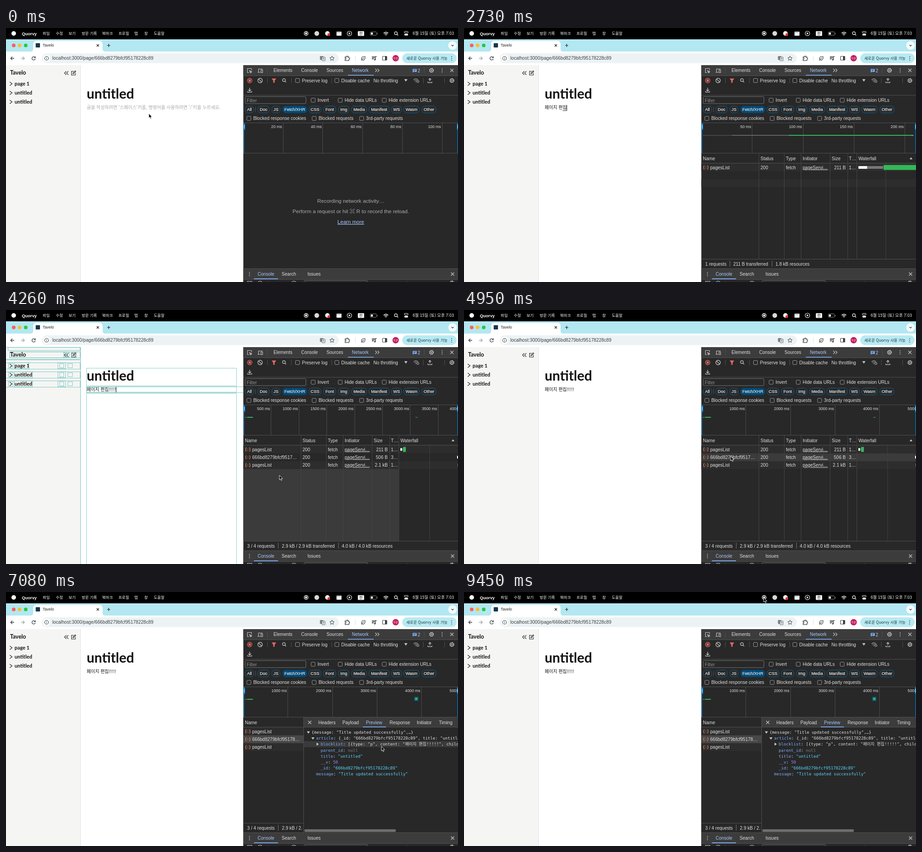
Write an HTML page that moves like this. It is 997x561 px and loops after 9930 ms.

```html
<!DOCTYPE html>
<html lang="ko">
<head>
<meta charset="utf-8">
<title>Page editor</title>
<style>
html, body { margin: 0; width: 100%; height: 100%; overflow: hidden; background: #fff; }
svg { display: block; width: 997px; height: 561px; }
text { font: 10.05px "Liberation Sans", Arial, sans-serif; fill: #e0e0e0; white-space: pre; }
text.ko { font: 500 8.5px "Noto Sans CJK KR", "Noto Sans CJK JP", sans-serif; }
text.body { font: 10px "Noto Sans CJK KR", "Noto Sans CJK JP", sans-serif; fill: #111; }
text.doc { font: bold 11.1px Lato, sans-serif; fill: #111; }
text.mono { font: 9.1px "DejaVu Sans Mono", "Noto Sans CJK KR", monospace; }
text.chip { font-size: 9.4px; text-anchor: middle; stroke: #e0e0e0; stroke-width: .25px; }
text.note { font-size: 11.7px; fill: #ababab; text-anchor: middle; }
text.end { text-anchor: end; }
text.mid { text-anchor: middle; }
text.blue, text.link { fill: #a8c7fa; }
text.link, text.under { text-decoration: underline; }
text.grey { fill: #8f8f8f; }
.k { fill: #7cacf8; } .s { fill: #5cd5fb; } .n { fill: #9980ff; } .u { fill: #7f7f7f; }
</style>
</head>
<body>
<svg id="stage" viewBox="0 0 997 561"></svg>
<script>
const LOOP = 9930;
const LINE = '#505050', DARK = '#282828', BAR = '#3c3c3c', ICON = '#c7c7c7', GREEN = '#34b85a';

const T = (x, y, s, cls = '', more = '') => `<text x="${x}" y="${y}" class="${cls}" ${more}>${s}</text>`;
const R = (x, y, w, h, fill, more = '') =>
  `<rect x="${x}" y="${y}" width="${w}" height="${h}" fill="${fill}" ${more}/>`;
const C = (x, y, r, fill, more = '') => `<circle cx="${x}" cy="${y}" r="${r}" fill="${fill}" ${more}/>`;
const I = (x, y, d, stroke = ICON, w = 1.2, fill = 'none') =>
  `<path transform="translate(${x} ${y})" d="${d}" stroke="${stroke}" stroke-width="${w}" fill="${fill}"/>`;
const V = (x, y, h, c = LINE) => R(x, y, 1, h, c);
const H = (x, y, w, c = LINE) => R(x, y, w, 1, c);
const G = (id, body) => `<g id="${id}">${body}</g>`;
const many = (list, f) => list.map(f).join('');

const CROSS = 'M-3.5-3.5L3.5 3.5M3.5-3.5L-3.5 3.5';
const DOTS = 'M0-4.6v1.6M0-.8v1.6M0 3v1.6';
const LENS = 'M3.2 0A3.2 3.2 0 1 1-3.2 0A3.2 3.2 0 1 1 3.2 0M2.3 2.3L5 5';
const RING = 'M5 0A5 5 0 1 1-5 0A5 5 0 1 1 5 0';
const WIFI = 'M-5-1.5Q0-6 5-1.5M-3 .8Q0-2 3 .8M-1 3Q0 2 1 3';

const gear = (x, y) => C(x, y, 4.2, 'none', `stroke="${ICON}" stroke-width="2" stroke-dasharray="2 1.3"`) +
  C(x, y, 3.4, 'none', `stroke="${ICON}"`) + C(x, y, 1.4, ICON);
const check = (x, y, label) =>
  R(x - 4.5, y - 4.5, 9, 9, 'none', 'rx="1.5" stroke="#9a9a9a"') + T(x + 9.7, y + 3.7, label);

function menuBar() {
  const menus = [[81, '파일'], [110, '수정'], [138, '보기'], [167, '방문 기록'], [212, '북마크'],
    [248, '프로필'], [283, '탭'], [305, '창'], [326, '도움말']];
  return R(0, 0, 997, 25, '#000') + C(17, 12, 5, '#fff') +
    T(35, 15.5, 'Quorvy', '', 'style="font-weight:bold;font-size:9.4px;fill:#fff"') +
    many(menus, ([x, s]) => T(x, 15, s, 'ko', 'style="fill:#fff"')) +
    C(662, 12, 4.2, 'none', 'stroke="#fff" stroke-width="1.4"') + C(662, 12, 2.2, '#fff') +
    C(685.5, 12, 5.2, '#d8d8d8') + C(709, 12, 5, '#fff') + C(712, 14.5, 3, '#e5362e') +
    R(729, 8, 11, 9, '#fff', 'rx="1"') + I(729, 10, 'M1 0h1.5M4 0h1.5M7 0h1.5', '#000', 1.2) +
    I(757.5, 12, RING, '#fff', 1.1) + I(757.5, 12, 'M-1.5-2.5L2.5 0L-1.5 2.5Z', 'none', 0, '#fff') +
    R(776, 7, 14, 10.5, '#fff', 'rx="1.5"') + T(783, 15.4, '한', 'ko mid', 'style="fill:#000"') +
    R(803.5, 8.5, 14, 7.5, 'none', 'rx="2" stroke="#8a8a8a"') + R(805, 10, 4, 4.5, '#fff') + R(819, 11, 1, 3, '#8a8a8a') +
    I(838, 13, WIFI, '#fff', 1.5) + I(860, 11.5, LENS, '#fff') +
    R(878.5, 7.5, 8.5, 3.6, 'none', 'rx="1.8" stroke="#fff"') + R(878.5, 13, 8.5, 3.6, '#fff', 'rx="1.8"') +
    T(988, 15.2, '6월 15일 (토) 오후 7:03', 'ko end', 'style="fill:#fff;font-size:9.1px"');
}

function browser() {
  const ink = '#3a3f42';
  return R(0, 25, 997, 27, '#b3e7f1') +
    C(17, 38.5, 4, '#fe5f57') + C(30, 38.5, 4, '#febc2e') + C(43.5, 38.5, 4, '#28c840') +
    I(0, 0, 'M54 52Q60 52 60 46V35Q60 28.500 67 28.500H206Q213 28.500 213 35V46Q213 52 219 52Z', 'none', 0, '#fff') +
    R(65.500, 33.500, 9.500, 9.500, '#17364a', 'rx="1"') +
    T(81, 41.300, 'Tavelo', '', 'style="font-size:8.6px;fill:#222"') +
    I(202.5, 38.5, 'M-2.5-2.5L2.5 2.5M2.5-2.5L-2.5 2.5', '#222') + I(226.5, 38.5, 'M-3.5 0H3.5M0-3.5V3.5', '#222') +
    C(985, 38.500, 9.500, '#f4fcfd') + I(985, 38.5, 'M-2.5-1.200L0 1.300L2.500-1.200', '#222') +
    R(0, 52, 997, 30, '#fff') +
    I(14, 67, 'M4 0H-3.500M0-3.700L-3.700 0L0 3.700', ink, 1.3) + I(37, 67, 'M-4 0H3.500M0-3.700L3.700 0L0 3.700', '#a4a8aa', 1.3) +
    I(61, 67, 'M3.2-1.800A3.700 3.700 0 1 0 3.600 1M3.800-4.200V-1.300H.9', ink, 1.3) +
    R(79, 56, 655, 21.500, '#edf3f5', 'rx="10.7"') + C(89.500, 67, 8, '#fff') +
    I(89.500, 67, 'M4.200 0A4.200 4.200 0 1 1-4.200 0A4.200 4.200 0 1 1 4.200 0M0-2.300v1.200M0 0v2.300', ink, 1.1) +
    T(102, 70.400, 'localhost:3000/page/666bd8279bfcf95178228c89', '', 'style="font-size:10.2px;fill:#3b3f42"') +
    R(692.500, 62, 7.500, 8.500, '#7a7f83', 'rx="1"') + R(697, 64, 7, 8.500, '#edf3f5', 'rx="1" stroke="#6d7276"') +
    I(700.5, 68, 'M-2-1.500H2M0-2.500V-1.500M1.300-1.500Q.5 1.500-2 2.500M-1.300-1Q.3 1.500 2 2.500', '#6d7276', .8) +
    I(719, 67, 'M0-5L1.400-1.700L5-1.400L2.300 1L3.100 4.500L0 2.600L-3.100 4.500L-2.300 1L-5-1.400L-1.400-1.700Z', ink, 1) +
    I(752.5, 67, 'M-4.500-3H-1.500Q-1.500-5 0-5T1.500-3H4V-.8Q5.500-.8 5.500 .7T4 2.200V4.800H-4.500V2Q-2.500 2-2.500 .7T-4.500-.6Z', ink, 1.3) +
    V(770, 61, 12, '#c6e9ef') +
    I(788, 67, 'M-3 3.500Q-6-2 0-4H4V0Q3 5-3 3.500ZM-4 5Q-2 0 2-1', ink) +
    I(812, 67, 'M-5-3.500H2M-5-1H2M-5 1.500H-1M3 3V-4H5.500', ink, 1.3) + C(813.500, 70, 1.700, ink) +
    R(830.500, 62.500, 9.500, 8.500, 'none', `stroke="${ink}" stroke-width="1.2" rx="1"`) + R(836, 62.500, 4, 8.500, ink) +
    C(859.500, 66.700, 7, '#c2185b') + T(859.500, 69, '두온', 'ko mid', 'style="font-size:5.800px;fill:#fff"') +
    R(874, 56, 120, 21.500, '#b9eaf3', 'rx="10.7"') +
    T(883, 70, '새로운 Quorvy 사용 가능', 'ko', 'style="fill:#17363c"') + I(983, 67, DOTS, '#17363c', 1.6);
}

function page() {
  return R(0, 82, 523, 479, '#fff') + R(0, 82, 164, 479, '#f5f5f3') + V(164, 82, 479, '#e4e4e2') +
    T(9, 103.2, 'Tavelo', 'doc', 'style="font-size:12.300px"') +
    I(133, 99.5, 'M0-4L-4 0L0 4M4.500-4L.5 0L4.500 4', '#222', 1.1) +
    I(149, 99.5, 'M0-4H-4.500V4.500H4V0M-1.500 1.500L-1-.7L3.500-5L5-3.500L.6 1Z', '#222', 1.1) +
    many(['page 1', 'untitled', 'untitled'], (s, i) =>
      I(11, 123.3 + 20 * i, 'M-2.800-4L2.500 0L-2.800 4', '#222') + T(19, 126.700 + 20 * i, s, 'doc')) +
    T(178, 156.300, 'untitled', 'doc', 'style="font-size:30px"') +
    T(178, 179.300, "글을 작성하려면 '스페이스'키를, 명령어를 사용하려면 '/'키를 누르세요.", 'body', 'id="hint" style="fill:#a8a8a8"') +
    T(178, 179.300, '', 'body', 'id="typed"') +
    G('ime', R(0, 182, 9, 1, '#222')) + G('caret', R(0, 170, 1, 12.500, '#111'));
}

function outlines() {
  const box = (x, y, w, h) => R(x + .5, y + .5, w, h, 'none');
  return `<g id="outlines" stroke="#37afa9" stroke-opacity=".6">` +
    box(-2, 82, 166, 482) + box(4, 82, 159, 7) + box(8, 92, 155, 13) + box(8, 92, 119, 13) + box(128, 93, 11, 11) + box(144, 93, 11, 11) +
    H(0, 109, 163, 'none') + many([116, 136, 156], (y, i) =>
      box(-2, y, 165, 14) + box(5, y + 1, 10, 11) + box(18, y, i ? 40 : 32, 13) + box(114, y, 17, 13) +
      box(118, y + 2, 9, 9) + box(136, y + 2, 10, 9)) +
    box(177, 128, 331, 39) + box(177, 169, 360, 13) + box(177, 169, 331, 12) + box(177, 184, 331, 400) + '</g>';
}

function devtools() {
  const chips = [['All', 527, 20], ['Doc', 555, 26], ['JS', 586, 19], ['Fetch/XHR', 610, 54], ['CSS', 668, 27],
    ['Font', 700, 28], ['Img', 733, 24], ['Media', 762, 34], ['Manifest', 800, 46], ['WS', 850, 23],
    ['Wasm', 877, 35], ['Other', 917, 32]];
  return R(523.500, 82, 474, 479, DARK) + R(523.500, 82, 474, 23, BAR) +
    I(537, 94, 'M-1 4.500H-4.500V-4.500H4.500V-1M0 0L5 2L2.800 2.800L2 5ZM2.500 2.500L5 5', ICON, 1.1) +
    I(561, 94, 'M-4 3.500V-3.500H5M-6 4H0M1.500-1.500H5V4.500H1.500Z') + V(576, 88, 12) +
    many([[590, 'Elements'], [651, 'Console'], [707, 'Sources']], ([x, s]) => T(x, 97.200, s)) +
    T(763, 97.200, 'Network', 'blue') + R(754, 103.500, 57, 1.800, '#7cacf8') +
    I(819, 93.500, 'M-4.500-3.500L-1 0L-4.500 3.500M.5-3.500L4 0L.5 3.500') +
    I(901.5, 94, 'M-4.500-3.500H4.500V3H-2.500L-4.500 4.500Z', 'none', 0, '#7cacf8') + I(901.5, 94, 'M-2.500-1.300H2.500M-2.500 .8H1', BAR, 1) +
    T(908, 97.600, '2', 'blue') + V(922, 88, 12) + gear(938.500, 93.500) + I(962, 93.500, DOTS, ICON, 1.8) + I(983.5, 93.5, CROSS) +
    H(524, 105, 473) +
    I(537.5, 116, RING, '#e46962', 1.3) + R(535, 113.500, 5, 5, '#e46962') + I(560.5, 116, RING + 'M-3.500-3.500L3.500 3.500', ICON, 1.3) +
    V(576, 110, 12) + I(591, 116, 'M-5-4.500H5L1.500 .5V5H-1.500V.5Z', 'none', 0, '#e46962') + I(613, 115, LENS) + V(629, 110, 12) +
    check(643, 116, 'Preserve log') + V(718, 110, 12) + check(729.7, 116, 'Disable cache') +
    T(810.500, 119.700, 'No throttling') + I(882, 115.500, 'M-3.500-2.500H3.500L0 3Z', 'none', 0, ICON) +
    I(904, 116, WIFI, '#9a9a9a', 1.2) + C(908.500, 118, 2.200, 'none', 'stroke="#9a9a9a" stroke-width="1.3"') + V(920, 110, 12) +
    I(935, 116, 'M0 2V-4.500M-3-1.700L0-4.700L3-1.700M-4.500 2.500V4.700H4.500V2.500', ICON, 1.3) + V(967, 110, 12) + gear(983.500, 116) +
    I(537.5, 137, 'M0-5V2M-3-.7L0 2.300L3-.7M-4.500 2.500V4.700H4.500V2.500', ICON, 1.3) + H(524, 148, 473) +
    R(527.500, 151.500, 134, 15.500, 'none', 'rx="2" stroke="#757575"') + T(531, 163.500, 'Filter', 'grey') +
    check(677.5, 159.5, 'Invert') + check(737.2, 159.5, 'Hide data URLs') + check(834.3, 159.5, 'Hide extension URLs') +
    V(550, 174, 12) + many(chips, ([s, x, w]) => {
      const on = s == 'Fetch/XHR';
      return R(x + .5, 172.500, w - 1, 15, on ? '#004a77' : 'none', `rx="6" stroke="${on ? '#004a77' : '#0d6498'}"`) +
        T(x + w / 2, 183.300, s, 'chip');
    }) +
    check(535.7, 199.7, 'Blocked response cookies') + check(679.7, 199.7, 'Blocked requests') + check(784.4, 199.7, '3rd-party requests') +
    H(524, 209, 473) + G('overview', '') +
    R(524, 210, 1.500, 66, '#0a6fae') + R(995.500, 210, 1.500, 66, '#0a6fae') +
    R(523.500, 211, 4, 14, '#0a84d0', 'rx="1"') + R(994.500, 211, 4, 14, '#0a84d0', 'rx="1"') + V(525, 214, 8, '#d5e8f5') + V(996, 214, 8, '#d5e8f5') +
    H(524, 276, 473);
}

const drawer = () => R(523.500, 531, 474, 24, BAR) + H(524, 531, 473) + I(537, 543.500, DOTS, ICON, 1.8) +
  T(555, 547.200, 'Console', 'blue') + R(547, 553, 53, 1.800, '#7cacf8') + T(608, 547.200, 'Search') + T(665, 547.200, 'Issues') +
  I(985, 543.500, CROSS) + R(523.500, 555, 474, 6, DARK) + H(524, 555, 473) +
  R(532.500, 559.500, 10, 8, 'none', `stroke="${ICON}"`) + I(560.5, 564, RING) + V(576, 559, 3) + I(635, 564, RING) +
  R(657.500, 558, 140, 12, 'none', 'rx="2" stroke="#757575"') + V(884, 559, 3) + gear(983.500, 563);

const empty = () => T(760.500, 386, 'Recording network activity…', 'note') +
  T(760.500, 409, 'Perform a request or hit ⌘ R to record the reload.', 'note') +
  T(760.500, 432, 'Learn more', 'note link', 'style="fill:#a8c7fa;font-size:11.500px"');

const ROW = 17.35, rowY = i => 299.200 + ROW * i;
const fileName = (i, s) => I(533.500, rowY(i) + 8.700, 'M-3-4Q-4.500-4-4.500-2T-5.500 0Q-4.500 0-4.500 2T-3 4M3-4Q4.500-4 4.500-2T5.500 0Q4.500 0 4.500 2T3 4M0-1.800v1.200M0 1v1.500', '#f0875a', 1.200) +
  T(543, rowY(i) + 12.400, s);

function tableRow(i, name, size, time) {
  const y = rowY(i) + 12.400;
  return fileName(i, name) + T(654, y, '200') + T(710, y, 'fetch') + T(747, y, 'pageServi…', 'under') +
    T(842, y, size, 'end') + T(849, y, time);
}

function table() {
  const heads = [[527, 'Name'], [654, 'Status'], [710, 'Type'], [747, 'Initiator'], [811, 'Size'], [849, 'T…'], [870, 'Waterfall']];
  const bars = (list, y) => many(list, ([x, w, c, h = 6]) => R(x, y - h / 2, w, h, c));
  const summary = (list, seps) => many(list, ([x, s]) => T(x, 524.500, s)) + many(seps, x => V(x, 514, 13, '#757575'));
  return R(523.500, 299, 474, ROW, '#2d2d2d') + R(523.500, rowY(2), 474, ROW, '#2d2d2d') +
    R(0, 0, 0, 0, '#3b3b3b', 'id="rowHover"') +
    many(heads, ([x, s]) => T(x, 291.700, s)) + I(986, 288, 'M-3 2L0-2.500L3 2Z', 'none', 0, ICON) +
    H(524, 298, 473) + many([650, 706, 743, 807, 846, 866], x => V(x, 277, 233, '#454545')) +
    tableRow(0, 'pagesList', '211 B', '1…') +
    G('first', V(930, 299, 211, '#404040') +
      bars([[870, 19.500, '#fff'], [889.500, 35, '#777'], [925.500, 72, GREEN, 11]], 308) +
      summary([[532, '1 requests'], [594, '211 B transferred'], [687, '1.8 kB resources']], [586, 679])) +
    G('later', V(934, 299, 211, '#404040') +
      tableRow(1, '666bd8279bfcf9517…', '506 B', '3…') + tableRow(2, 'pagesList', '2.1 kB', '1…') +
      bars([[870, 3, '#fff'], [873, 2.500, '#777'], [876, 6, GREEN, 11]], 308) +
      bars([[995, 2, '#fff']], 325) + bars([[996, 1, '#777']], 342.500) +
      summary([[532, '3 / 4 requests'], [608.500, '2.9 kB / 2.9 kB transferred'], [740.500, '4.0 kB / 4.0 kB resources']], [600, 733])) +
    H(524, 510, 473);
}

const TREE = 13.2, treeY = i => 313 + TREE * i;
const leaf = (x, i, s) => T(x, treeY(i), s, 'mono');
const arrow = (x, i, open) => I(x, treeY(i) - 3.300, open ? 'M-3.500-2H3.500L0 3Z' : 'M-2-3.500V3.500L3 0Z', 'none', 0, ICON);
const pair = (key, cls, value) => `<tspan class="k">${key}</tspan>: <tspan class="${cls}">${value}</tspan>`;

function detail() {
  const tabs = [[689, 'Headers'], [742, 'Payload'], [794, 'Preview'], [846, 'Response'], [906, 'Initiator'], [955, 'Timing']];
  const id = '"666bd8279bfcf95178228c89"';
  const done = pair('message', 's', '"Title updated successfully"');
  const thumb = w => R(658, 524, w, 6, '#6e6e6e', 'rx="3"');
  return R(523.500, 277, 474, 254, DARK) + T(527, 291.700, 'Name') + H(524, 298, 132) +
    R(523.500, rowY(0), 133, ROW, '#2d2d2d') + R(523.500, rowY(2), 133, ROW, '#2d2d2d') +
    R(523.500, rowY(1), 133, ROW, '#004a77', 'id="picked"') +
    fileName(0, 'pagesList') + fileName(1, '666bd8279bfcf95178…') + fileName(2, 'pagesList') +
    H(524, 510, 132) + T(532, 524.500, '3 / 4 requests') + V(600, 514, 13, '#757575') + T(608.500, 524.500, '2.9 kB / 2.') +
    R(656, 277, 341, 22, BAR) + V(656, 277, 254) + I(670, 288, CROSS) +
    many(tabs, ([x, s]) => T(x, 291.700, s, s == 'Preview' ? 'blue' : '')) +
    H(657, 298, 340) + R(787, 297.200, 51, 1.800, '#7cacf8') +
    R(657, 0, 340, TREE, '#3a3a3a', 'id="treeHover"') +
    arrow(667, 0, true) + leaf(674, 0, '{message: "Title updated successfully",…}') +
    leaf(684, 1, `<tspan class="k">article</tspan>: {_id: ${id}, title: "untitled", parent_id: null}`) +
    G('closed', arrow(677, 1, false) + leaf(684, 2, done) + thumb(310)) +
    G('opened', arrow(677, 1, true) + arrow(687, 2, false) +
      leaf(694, 2, '<tspan class="k">blocklist</tspan>: [{type: "p", content: "페이지 편집!!!!!", children: []}]') +
      leaf(694, 3, pair('parent_id', 'u', 'null')) + leaf(694, 4, pair('title', 's', '"untitled"')) +
      leaf(694, 5, pair('__v', 'n', '50')) + leaf(694, 6, pair('_id', 's', id)) + leaf(684, 7, done) + thumb(202));
}

const pointer = '<path id="pointer" d="M0 0V9.800L2.300 7.800L3.900 11.500L5.700 10.700L4.200 7.200H7.200Z" fill="#000" stroke="#fff" stroke-width=".9"/>';

document.getElementById('stage').innerHTML = page() + outlines() + devtools() + G('empty', empty()) +
  G('table', table()) + G('detail', detail()) + drawer() + browser() + menuBar() + pointer;

const $ = id => document.getElementById(id);
const show = (id, on) => { $(id).style.display = on ? '' : 'none'; };
const place = (el, attrs) => { for (const k in attrs) el.setAttribute(k, attrs[k]); };

// Moments of the story, in ms
const LOADED = 510, FOCUS = 700, TYPE = 1300, KEY = 110, BANG = 3090, WAKE = 3700, SAVED = 4170, PICK = 5250, OPEN = 6450;
const flashes = [[510, 770], [1300, 1600], [4180, 4560]];
const strokes = ['ㅍ', '페', '페ㅇ', '페이', '페이ㅈ', '페이지', '페이지 ', '페이지 ㅍ', '페이지 펴', '페이지 편',
  '페이지 편ㅈ', '페이지 편지', '페이지 편집'];
const track = [[480, 315, 189], [690, 290, 176], [WAKE, 290, 176], [4200, 603, 365], [4300, 603, 365], [4900, 588, 323],
  [5400, 588, 323], [5750, 690, 300], [6250, 678, 322], [6550, 678, 322], [7050, 828, 341], [7200, 828, 341],
  [7600, 800, 366], [8120, 765, 270], [8700, 780, 180], [9210, 722, 90], [9440, 661, 12.500]];
const spans = [[480, 108], [650, 211], [4170, 211], [4260, 3856], [4450, 4820]];

// Eased values between the points of a [time, ...values] list
function along(list, t) {
  const n = list.findIndex(p => p[0] > t);
  if (n < 1) return (n ? list[list.length - 1] : list[0]).slice(1);
  const a = list[n - 1], b = list[n], u = (t - a[0]) / (b[0] - a[0]), e = u * u * (3 - 2 * u);
  return a.slice(1).map((v, i) => v + (b[i + 1] - v) * e);
}

function overview(t) {
  const scale = 473.5 / along(spans, t)[0];
  let step = 1;
  for (let i = 0; step * scale < 60; i++) step *= [2, 2.5, 2][i % 3];
  let s = '';
  for (let ms = step; ms * scale < 510; ms += step) {
    const x = 523.6 + ms * scale;
    s += V(Math.round(x - .5), 210, 66, '#4c4c4c') + T(x - 2.500, 221.200, ms + ' ms', 'end', 'style="font-size:8.800px"');
  }
  if (t >= SAVED) {
    s += R(527, 236.300, 4, 1.500, '#777') + R(532, 236, 12.500, 2, GREEN);
    s += t < PICK ? R(903, 236.500, 5, 1.300, '#2c8f6a') : R(901.500, 232.500, 7, 7, GREEN, 'stroke="#0b5c8c" stroke-width="2"');
  } else if (t >= LOADED) {
    s += R(527, 236.500, 64, 1.300, '#555') + R(591, 236.300, 125, 1.500, '#777') + R(716, 236, 271, 2, GREEN) + R(987, 236, 4.500, 2, '#5aa9e6');
  }
  return s;
}

function render(t) {
  const [x, y] = along(track, t);
  place($('pointer'), { transform: `translate(${x} ${y})` });
  show('pointer', t < TYPE || t >= WAKE);

  const key = Math.min(Math.floor((t - TYPE) / KEY), strokes.length - 1);
  const bangs = t < BANG ? 0 : Math.min(Math.floor((t - BANG) / KEY) + 1, 5);
  const words = key < 0 ? '' : strokes[key] + '!'.repeat(bangs);
  const typed = $('typed');
  if (typed.textContent !== words) typed.textContent = words;
  const end = 178 + (words ? typed.getComputedTextLength() : 0);
  const composing = words && !bangs && !words.endsWith(' ');
  show('hint', !words);
  show('ime', composing);
  if (composing) {
    const w = typed.getSubStringLength(words.length - 1, 1);
    place($('ime').firstChild, { x: end - w, width: w });
  }
  const resting = t > SAVED && (t - SAVED) % 1000 > 500;
  show('caret', t >= FOCUS && t < PICK && !resting);
  place($('caret').firstChild, { x: end - .5 });
  show('outlines', flashes.some(([a, b]) => t >= a && t < b));

  $('overview').innerHTML = overview(t);
  const saved = t >= SAVED, picked = t >= PICK, open = t >= OPEN;
  show('empty', t < LOADED);
  show('table', t >= LOADED && !picked);
  show('first', !saved);
  show('later', saved);
  show('detail', picked);
  show('closed', !open);
  show('opened', open);
  place($('picked'), { fill: open ? '#474747' : '#004a77' });

  const row = Math.floor((y - rowY(0)) / ROW);
  show('rowHover', saved && x > 524 && row >= 0);
  place($('rowHover'), row > 2
    ? { x: 523.5, y: rowY(3), width: 343, height: 510 - rowY(3) }
    : { x: 523.5, y: rowY(Math.max(row, 0)), width: 474, height: ROW });
  const node = Math.floor((y - 303) / TREE);
  show('treeHover', x > 657 && node >= 0 && node < (open ? 8 : 3));
  place($('treeHover'), { y: 303 + TREE * node });
}

const start = performance.now();
function tick() {
  render((performance.now() - start) % LOOP);
  requestAnimationFrame(tick);
}
tick();
</script>
</body>
</html>
```
